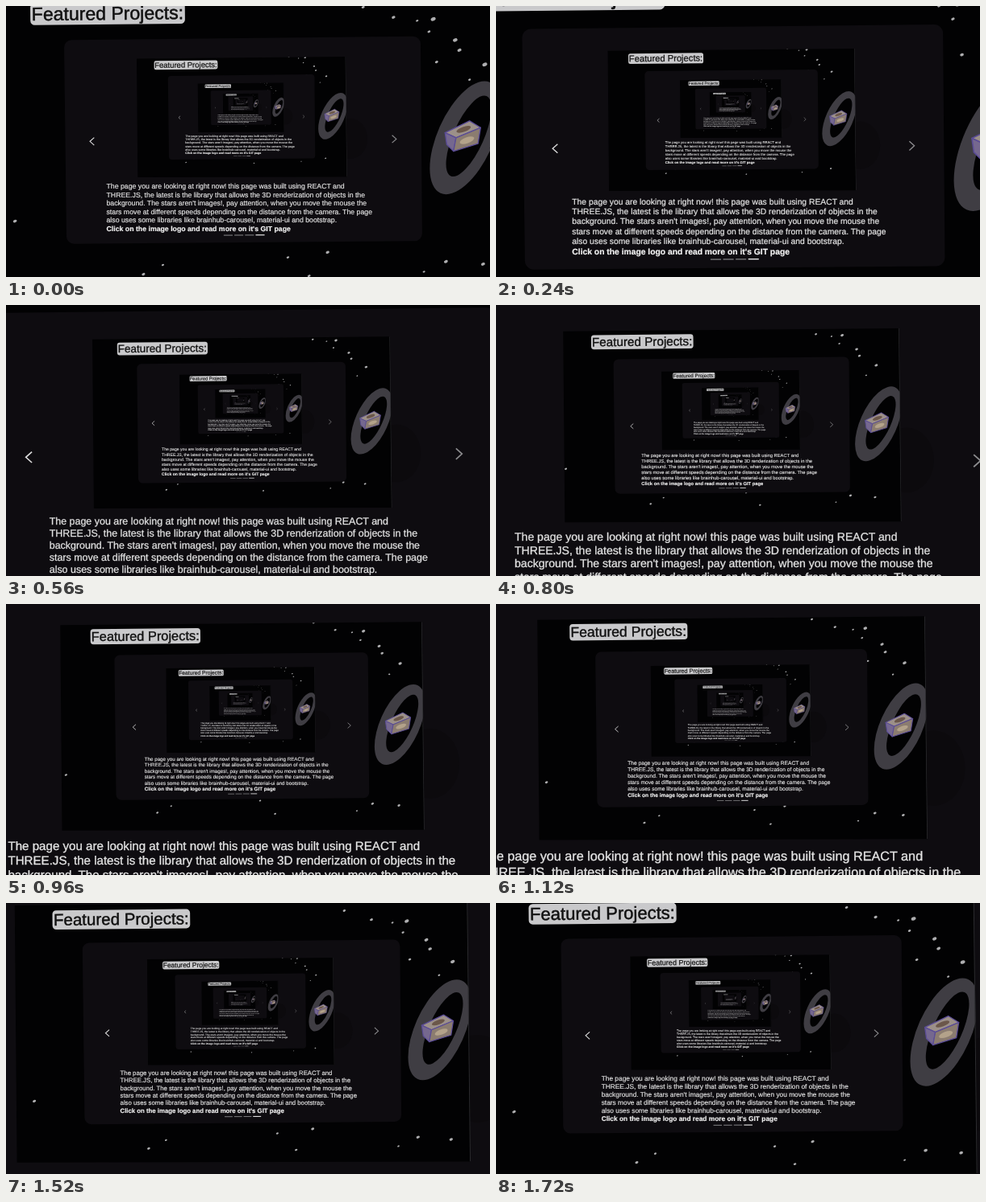
An HTML page with a canvas for the animation above (1760 ms loop, 600x337 px).

```html
<!DOCTYPE html>
<html lang="en">
<head>
<meta charset="utf-8">
<title>Endless page zoom</title>
<style>
  html, body { margin: 0; width: 100%; height: 100%; overflow: hidden; background: #000; }
  canvas { display: block; width: 100%; height: 100%; }
</style>
</head>
<body>
<canvas id="stage" width="600" height="337"></canvas>
<script>
const ctx = document.getElementById('stage').getContext('2d');
const LOOP = 1760, STEP = 40;
const PAGE_WIDTH = 604;
const NEST = { x: 176, y: 72, scale: 0.411 };
const DEPTH = 6;
const FONT = '"Liberation Sans", Arial, sans-serif';
const CARD_COLOR = '#0e0c10';

const PAGE_EDGE = [[0, 0], [602, -5.5], [606, 341.5], [3, 343]];
const CARD_EDGE = [[90, 50], [512, 45.5], [514, 288.5], [93, 292]];
const COPY = [
  'The page you are looking at right now! this page was built using REACT and',
  'THREE.JS, the latest is the library that allows the 3D renderization of objects in the',
  "background. The stars aren't images!, pay attention, when you move the mouse the",
  'stars move at different speeds depending on the distance from the camera. The page',
  'also uses some libraries like brainhub-carousel, material-ui and bootstrap.',
  "Click on the image logo and read more on it's GIT page"
];
// x, y, radius where the drift ends
const STARS = [
  [527, 25, 2.6], [553, 50, 2.4], [558, 62, 2.2], [522, 40, 1.6], [531, 76, 1.7],
  [588, 79, 2.6], [480, 23, 1.9], [508, 27, 1.4], [570, 97, 1.4], [586, 316, 2.1],
  [542, 313, 2.1], [516, 325, 1.3], [402, 302, 1.9], [355, 308, 1.5], [380, 330, 1.6],
  [184, 328, 1.8], [207, 317, 1.4], [32, 265, 2], [444, 11, 1.7]
];

function polygon(points, radius = 0) {
  const mid = (a, b) => [(a[0] + b[0]) / 2, (a[1] + b[1]) / 2];
  ctx.beginPath();
  ctx.moveTo(...mid(points.at(-1), points[0]));
  points.forEach((p, i) => {
    const next = points[(i + 1) % points.length];
    if (radius) ctx.arcTo(...p, ...next, radius);
    else ctx.lineTo(...p);
  });
  ctx.closePath();
}

function fillPolygon(points, color, radius) {
  polygon(points, radius);
  ctx.fillStyle = color;
  ctx.fill();
}

function oval(x, y, rx, ry, angle, color) {
  ctx.beginPath();
  ctx.ellipse(x, y, rx, ry, angle, 0, Math.PI * 2);
  ctx.fillStyle = color;
  ctx.fill();
}

function line(points, width, color) {
  ctx.beginPath();
  points.forEach(p => ctx.lineTo(...p));
  ctx.lineWidth = width;
  ctx.lineJoin = 'miter';
  ctx.strokeStyle = color;
  ctx.stroke();
}

// The thin outline gives the slightly heavy look of filmed text.
function text(string, x, y, size, color, weight = '') {
  ctx.font = `${weight} ${size}px ${FONT}`;
  ctx.fillStyle = ctx.strokeStyle = color;
  ctx.lineWidth = size * 0.022;
  ctx.fillText(string, x, y);
  ctx.strokeText(string, x, y);
}

function drawStars(age) {
  const left = 1 - Math.min(Math.max((age - 300) / 1420, 0), 1);
  for (const [x, y, r] of STARS) {
    oval(x - 42 * left, y - 28 * left, r * 1.15, r * 0.8, -0.4, '#aeaeb0');
  }
}

function drawRing() {
  ctx.beginPath();
  ctx.ellipse(565, 166, 33, 72, 0.42, 0, Math.PI * 2);
  ctx.ellipse(569, 164, 18, 52, 0.42, 0, Math.PI * 2);
  ctx.fillStyle = '#3f3d43';
  ctx.fill('evenodd');
}

function drawCube() {
  const a = [541, 160], b = [570, 146], c = [583, 154], d = [554, 166];
  const e = [543, 174], f = [551, 182], g = [580, 173];
  const faces = [[[a, b, c, d], '#9c9089'], [[a, d, f, e], '#75688f'], [[d, c, g, f], '#8b7c70']];
  ctx.lineWidth = 1.3;
  ctx.lineJoin = 'round';
  ctx.strokeStyle = '#5a4c96';
  for (const [points, color] of faces) {
    fillPolygon(points, color);
    ctx.stroke();
  }
  oval(563, 156, 9, 3, -0.35, '#6b574a');
  oval(567, 169, 9, 3.5, -0.35, '#b3a28a');
}

function drawTitle() {
  ctx.save();
  ctx.translate(50, 6.8);
  ctx.rotate(-0.01);
  ctx.beginPath();
  ctx.roundRect(0, 0, 183, 25.5, 5);
  ctx.fillStyle = '#c9c9cb';
  ctx.fill();
  text('Featured Projects:', 1.5, 20, 22, '#111');
  ctx.restore();
}

function drawArrow(x, y, direction, color) {
  const open = x + 2.5 * direction, tip = x - 2.5 * direction;
  line([[open, y - 4.5], [tip, y], [open, y + 4.5]], 1.1, color);
}

function drawCard() {
  fillPolygon(CARD_EDGE, CARD_COLOR, 9);
  oval(429, 167, 20, 24, 0, '#0c0a0d');
  drawArrow(123.2, 170.3, 1, '#dcdcdc');
  drawArrow(480.8, 167.5, -1, '#8c8c8e');
  COPY.forEach((row, i) => {
    const last = i === COPY.length - 1;
    text(row, 140.2, 226.3 + i * 10.03, 8.36, last ? '#f4f4f4' : '#e4e4e4', last ? 'bold' : '');
  });
  for (let i = 0; i < 4; i++) {
    ctx.fillStyle = i === 3 ? '#eee' : '#78787a';
    ctx.fillRect(279 + i * 12.6, 281.2 - i * 0.1, 10.6, 1.1);
  }
}

function drawPage(depth, age) {
  ctx.save();
  polygon(PAGE_EDGE);
  ctx.fillStyle = '#020203';
  ctx.fill();
  ctx.clip();
  drawStars(age);
  drawRing();
  drawCube();
  line([PAGE_EDGE[1], PAGE_EDGE[2]], 2, '#2c2c2f');
  drawTitle();
  drawCard();
  if (depth > 1) {
    ctx.translate(NEST.x, NEST.y);
    ctx.scale(NEST.scale, NEST.scale);
    drawPage(depth - 1, age - LOOP);
  }
  ctx.restore();
}

function render(time) {
  const t = Math.floor((time % LOOP) / STEP) * STEP;
  const growth = 0.195 * t + 3e-6 * t * t;
  const inner = (260 + growth) / PAGE_WIDTH;
  const outer = inner / NEST.scale;
  ctx.setTransform(1, 0, 0, 1, 0, 0);
  ctx.fillStyle = CARD_COLOR;
  ctx.fillRect(0, 0, 600, 337);
  ctx.translate(162 - 0.4985 * growth - NEST.x * outer, 65.4 - 0.206 * growth - NEST.y * outer);
  ctx.scale(outer, outer);
  ctx.textRendering = 'geometricPrecision';
  drawPage(DEPTH, t + LOOP);
}

const start = performance.now();
function tick() {
  render(performance.now() - start);
  requestAnimationFrame(tick);
}
tick();
</script>
</body>
</html>
```
